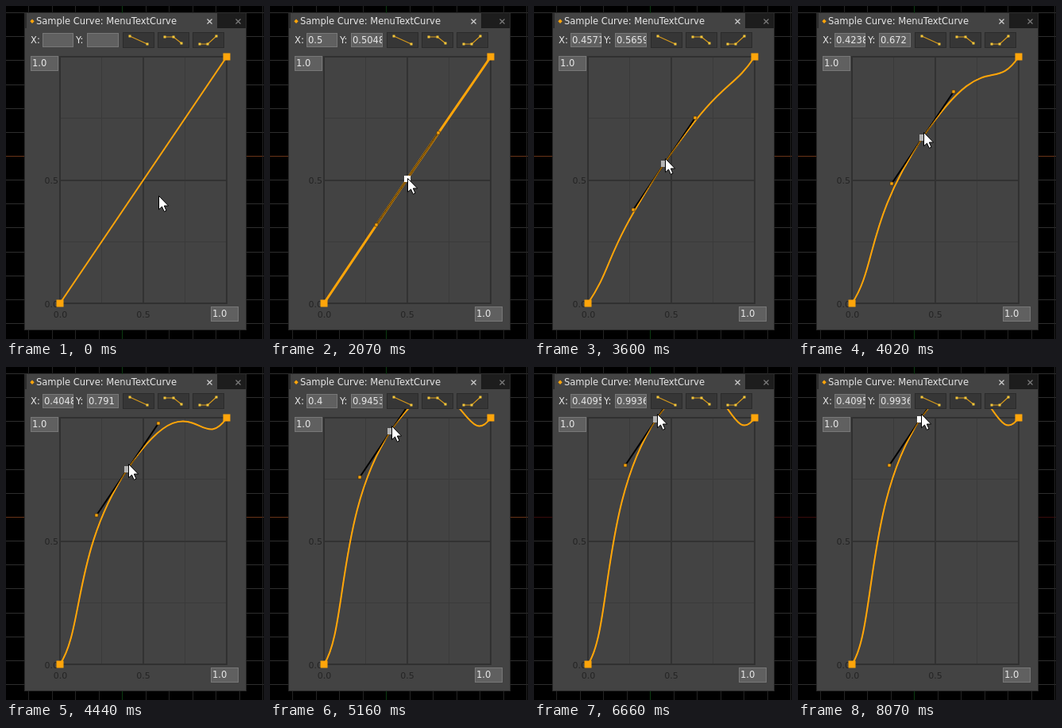
An HTML page for the animation above (8100 ms loop, 325 by 420 pixels).

```html
<!DOCTYPE html>
<html lang="en">
<head>
<meta charset="utf-8">
<title>Curve editor</title>
<style>
html, body { margin: 0; width: 100%; height: 100%; overflow: hidden; background: #000; }
svg { display: block; width: 325px; height: 420px; }
text { font: 11.5px "DejaVu Sans", sans-serif; fill: #e6e6e6; white-space: pre; }
.crisp { shape-rendering: crispEdges; }
.axis text { font-size: 11px; fill: #242424; }
.field { fill: #606060; stroke: #787878; }
.button { fill: #363636; stroke: #2b2b2b; }
.icon path { fill: none; stroke: #d69a1c; stroke-width: 1.2; }
.icon rect { fill: #f4c63a; }
#curve, #core { fill: none; stroke: #ffa50a; stroke-linejoin: round; }
#core { stroke-width: .9; }
#bar { stroke: #000; stroke-width: 2; }
</style>
</head>
<body>
<svg viewBox="0 0 325 420">
  <defs>
    <clipPath id="body"><rect x="24" y="53" width="278" height="355"/></clipPath>
    <clipPath id="clipX"><rect x="46" y="34" width="39" height="18"/></clipPath>
    <clipPath id="clipY"><rect x="102" y="34" width="39" height="18"/></clipPath>
  </defs>
  <g id="grid" class="crisp"></g>
  <g class="crisp">
    <rect x="23" y="9" width="280" height="400" fill="#2b2b2b"/>
    <rect x="24" y="28" width="278" height="380" fill="#434343"/>
    <rect x="266" y="9" width="36" height="19" fill="#1d1d1d"/>
    <rect x="26" y="9" width="240" height="20" fill="#434343"/>
  </g>
  <path d="M33 16.5L35.7 19.2L33 21.9L30.3 19.2Z" fill="#ffa50a"/>
  <text x="38" y="23">Sample Curve: MenuTextCurve</text>
  <path d="M253.5 16.5l6 6m0-6l-6 6" stroke="#d0d0d0" stroke-width="1.2"/>
  <path d="M289.5 16.5l6 6m0-6l-6 6" stroke="#7c7c7c" stroke-width="1.2"/>
  <text x="31" y="47">X:</text>
  <text x="88" y="47">Y:</text>
  <g class="crisp">
    <rect class="field" x="46.5" y="34.5" width="38" height="17"/>
    <rect class="field" x="102.5" y="34.5" width="39" height="17"/>
  </g>
  <g clip-path="url(#clipX)"><text id="valX" x="48" y="47"></text></g>
  <g clip-path="url(#clipY)"><text id="valY" x="104" y="47"></text></g>
  <g id="buttons"></g>
  <g id="plot" class="crisp"></g>
  <g class="axis">
    <text x="66" y="224" text-anchor="end">0.5</text>
    <text x="66" y="380" text-anchor="end">0.0</text>
    <text x="68.5" y="393" text-anchor="middle">0.0</text>
    <text x="173" y="393" text-anchor="middle">0.5</text>
  </g>
  <g class="crisp">
    <rect class="field" x="31.5" y="63.5" width="34" height="18"/>
    <rect class="field" x="258.5" y="379.5" width="34" height="18"/>
  </g>
  <text x="33" y="76">1.0</text>
  <text x="260" y="392">1.0</text>
  <g clip-path="url(#body)">
    <path id="curve"/>
    <g id="selected">
      <path id="bar"/>
      <path id="core"/>
      <rect class="knob" width="4" height="4" fill="#ffa50a" stroke="#4a3410" stroke-width=".7"/>
      <rect class="knob" width="4" height="4" fill="#ffa50a" stroke="#4a3410" stroke-width=".7"/>
      <rect id="key" class="crisp" width="8" height="8"/>
    </g>
    <g fill="#ffa50a">
      <rect x="63.5" y="370.5" width="9" height="9"/>
      <rect x="273.5" y="59.5" width="9" height="9"/>
    </g>
  </g>
  <path id="cursor" d="M0 0V17.2L4 13.6L6.7 19.8L9.5 18.6L6.8 12.5H12.1Z" fill="#fff" stroke="#000" stroke-width="1"/>
</svg>
<script>
const $ = id => document.getElementById(id);
const LOOP = 8100, STEP = 30;
const ADDED = 2070, PRESSED = 2550, RELEASED = 8070, DRAG = 3090;
const X0 = 68, Y0 = 375, W = 210, H = 311, X1 = X0 + W, Y1 = Y0 - H;
const HANDLE = [39, -58], SLOPE = 58 / 39;
// handle reach at the start and end of each segment, as a share of its width
const LEFT = [.35, .8], RIGHT = [.65, .27];

// [ms, x, y] in plot pixels from the lower left corner
const keyPath = [
  [3090, 105, 157], [3600, 96, 176], [4440, 85, 246], [5160, 84, 294],
  [5580, 78, 304], [6060, 78, 304], [6090, 79, 305], [6390, 84, 308],
  [6540, 84, 308], [6660, 86, 309]
];
// [ms, x, y] on the stage, until the drag begins
const mousePath = [
  [210, 192, 239], [480, 180, 225], [630, 180, 225], [1020, 173, 217],
  [2490, 173, 217], [2580, 174, 211]
];

// Monotone cubic through the points of column c
function sample(path, t, c) {
  const last = path.length - 1;
  if (t <= path[0][0]) return path[0][c];
  if (t >= path[last][0]) return path[last][c];
  let i = 0;
  while (t > path[i + 1][0]) i++;
  const rate = j => j < 0 || j >= last ? 0 :
    (path[j + 1][c] - path[j][c]) / (path[j + 1][0] - path[j][0]);
  const slope = j => {
    const a = rate(j - 1), b = rate(j);
    return a * b > 0 ? 2 * a * b / (a + b) : 0;
  };
  const [p, q] = [path[i], path[i + 1]];
  const d = q[0] - p[0], s = (t - p[0]) / d, r = 1 - s;
  return p[c] * r * r * (1 + 2 * s) + q[c] * s * s * (3 - 2 * s)
    + d * (slope(i) * s * r * r - slope(i + 1) * s * s * r);
}

function curveTo(x0, y0, x1, y1, [a, b]) {
  const d = x1 - x0;
  return `C${x0 + a * d} ${y0 - a * d * SLOPE} ${x1 - b * d} ${y1 + b * d * SLOPE} ${x1} ${y1}`;
}

const line = (x0, y0, x1, y1, color, width = 1, id = "") =>
  `<path id="${id}" d="M${x0} ${y0}L${x1} ${y1}" stroke="${color}" stroke-width="${width}"/>`;

function buildGrid() {
  let out = "";
  for (let k = -6; k < 8; k++) {
    const y = Math.round(189 + 30.15 * k) + .5;
    out += line(0, y, 325, y, "#2e2e2e", 1, k ? "" : "axisX");
  }
  for (let k = -4; k < 7; k++) {
    const x = Math.round(146 + 29.5 * k) + .5;
    out += line(x, 0, x, 420, k ? "#242424" : "#0b3a10");
  }
  $("grid").innerHTML = out;
}

function buildPlot() {
  let out = "";
  for (const f of [.25, .75]) {
    const x = Math.floor(X0 + W * f) + .5, y = Math.floor(Y0 - H * f) + .5;
    out += line(x, Y1, x, Y0, "#3a3a3a") + line(X0, y, X1, y, "#3a3a3a");
  }
  out += line(173, Y1, 173, Y0, "#323232", 2) + line(X0, 220, X1, 220, "#323232", 2);
  $("plot").innerHTML = out +
    `<rect x="${X0}" y="${Y1}" width="${W}" height="${H}" fill="none" stroke="#303030" stroke-width="2"/>`;
}

function buildButtons() {
  const icons = [
    [[156, 38], [178, 48]],
    [[200, 39], [211, 39], [221, 47]],
    [[244, 48], [254, 48], [265, 38]]
  ];
  $("buttons").innerHTML = icons.map((pts, i) =>
    `<rect class="button crisp" x="${147.5 + 44 * i}" y="33.5" width="39" height="19"/>` +
    `<g class="icon"><path d="M${pts.join("L")}"/>` +
    pts.map(([x, y]) => `<rect x="${x - 1.5}" y="${y - 1.5}" width="3" height="3"/>`).join("") +
    "</g>").join("");
}

function place(el, x, y) {
  el.setAttribute("x", x);
  el.setAttribute("y", y);
}

function draw(ms) {
  const t = Math.floor((ms % LOOP) / STEP) * STEP;
  const active = t >= ADDED;
  const held = t >= PRESSED && t < RELEASED;
  const px = Math.round(sample(keyPath, t, 1)), py = Math.round(sample(keyPath, t, 2));
  const x = X0 + px, y = Y0 - py;
  const [hx, hy] = HANDLE;

  const d = active
    ? `M${X0} ${Y0}` + curveTo(X0, Y0, x, y, LEFT) + curveTo(x, y, X1, Y1, RIGHT)
    : `M${X0} ${Y0}L${X1} ${Y1}`;
  $("curve").setAttribute("d", d);
  $("curve").setAttribute("stroke-width", active && t < PRESSED ? 3 : 2);
  $("core").setAttribute("d", d);

  $("selected").style.display = active ? "" : "none";
  $("bar").setAttribute("d", `M${x - hx} ${y - hy}L${x + hx} ${y + hy}`);
  document.querySelectorAll(".knob").forEach((el, i) => {
    const s = i ? 1 : -1;
    place(el, x + s * hx - 2, y + s * hy - 2);
  });
  place($("key"), x - 4, y - 4);
  $("key").setAttribute("fill", held ? "#b4b4b4" : "#fff");

  $("valX").textContent = active ? +(px / W).toFixed(4) : "";
  $("valY").textContent = active ? +(py / H).toFixed(4) : "";
  $("axisX").setAttribute("stroke", t < 6570 ? "#6a3418" : "#3a0c0c");

  const mx = t < DRAG ? sample(mousePath, t, 1) : x + 1;
  const my = t < DRAG ? sample(mousePath, t, 2) : y - 7;
  $("cursor").setAttribute("transform", `translate(${Math.round(mx) + .5} ${Math.round(my) + .5})`);
}

buildGrid();
buildPlot();
buildButtons();
const start = performance.now();
function tick() {
  draw(performance.now() - start);
  requestAnimationFrame(tick);
}
draw(0);
requestAnimationFrame(tick);
</script>
</body>
</html>
```
